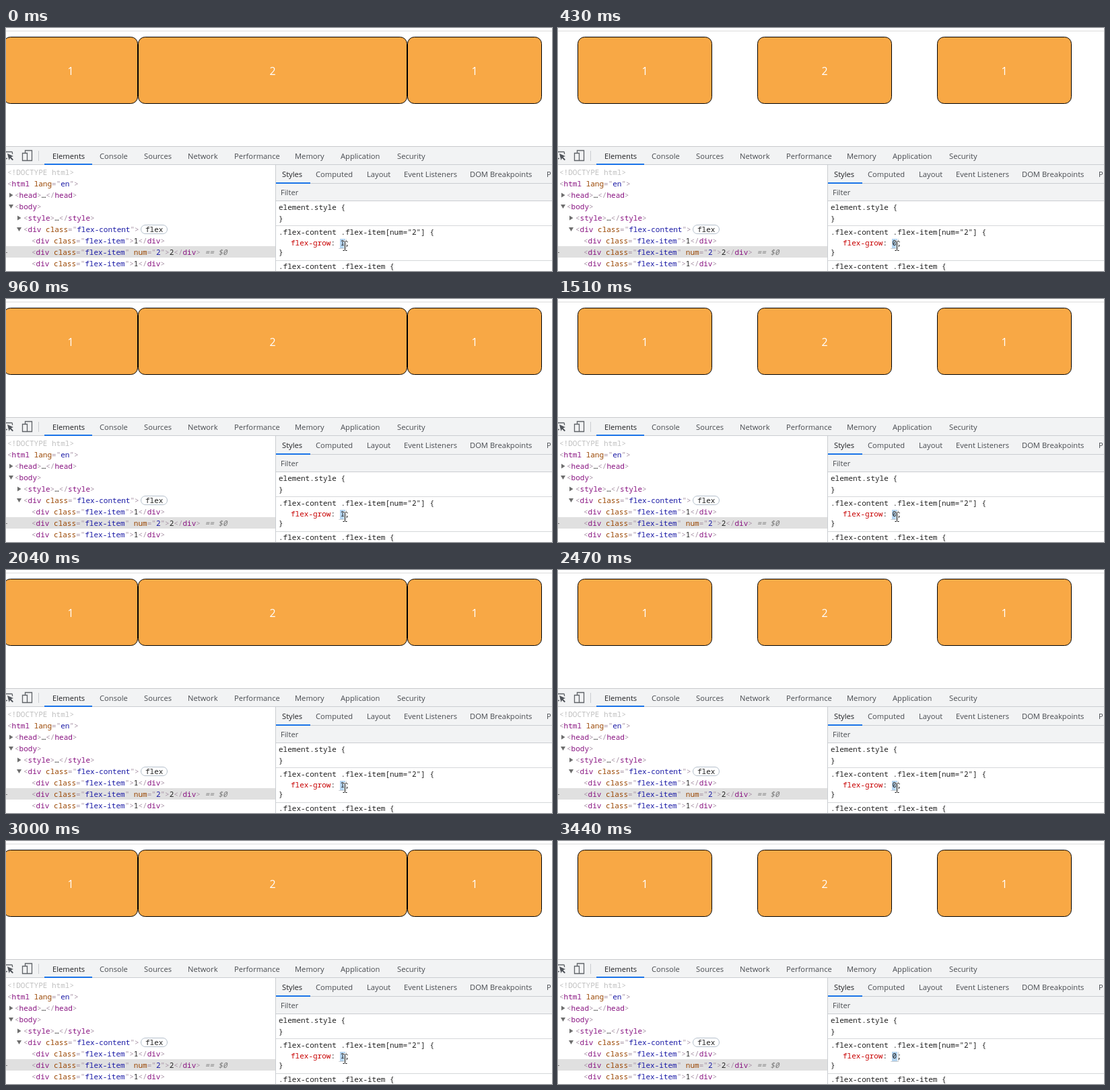
An HTML page that plays this animation: 811 by 362 pixels, repeating every 3.9 s.

```html
<!DOCTYPE html>
<html lang="en">
<head>
<meta charset="utf-8">
<title>flex-grow toggle</title>
<style>
html, body { margin: 0; width: 100%; height: 100%; overflow: hidden; background: #fff; }
svg { display: block; }
text { white-space: pre; }
.ui { font: 11.2px "Open Sans", "Noto Sans", sans-serif; fill: #484b50; }
.ui.on { fill: #202124; }
.code { font: 11px "Noto Sans Mono", "DejaVu Sans Mono", monospace; fill: #222; }
.num { font: 16px "Open Sans", "Noto Sans", sans-serif; fill: #fff; text-anchor: middle; }
.p { fill: #a894a6; }
.t { fill: #881280; }
.a { fill: #994500; }
.v { fill: #1a1aa6; }
.red { fill: #c80000; }
.doc { fill: #c0c0c0; }
.ref { fill: #777; font-style: italic; }
</style>
</head>
<body>
<svg id="stage" width="811" height="362" viewBox="0 0 811 362"></svg>
<script>
const stage = document.getElementById("stage");
const LOOP = 3900;
const TOGGLES = [430, 960, 1510, 2040, 2470, 3000, 3440];
const WIDE = [[-4, 200], [196, 400], [596, 200]];
const EVEN = [[29, 200], [296, 200], [563, 200]];

const esc = s => s.replace(/&/g, "&amp;").replace(/</g, "&lt;").replace(/>/g, "&gt;");
const rect = (x, y, w, h, fill, more = "") =>
  `<rect x="${x}" y="${y}" width="${w}" height="${h}" fill="${fill}" ${more}/>`;
const path = (d, more) => `<path d="${d}" ${more}/>`;
const label = (x, y, s, cls = "ui") => `<text x="${x}" y="${y}" class="${cls}">${esc(s)}</text>`;
const code = (x, y, parts) => `<text x="${x}" y="${y}" class="code">${parts}</text>`;
const span = (cls, s) => `<tspan class="${cls}">${esc(s)}</tspan>`;

const open = (tag, attrs = {}) => span("p", "<") + span("t", tag) +
  Object.entries(attrs).map(([k, v]) =>
    " " + span("a", k) + span("p", '="') + span("v", v) + span("p", '"')).join("") +
  span("p", ">");
const close = tag => span("p", "</") + span("t", tag) + span("p", ">");
const arrow = (x, y, down) => path(
  down ? `M${x} ${y - 3}h7l-3.5 6z` : `M${x + 1} ${y - 3.5}v7l5.5-3.5z`, 'fill="#6e6e6e"');

function toolbars() {
  const top = [[69, "Elements"], [139, "Console"], [205, "Sources"], [270, "Network"],
    [339, "Performance"], [429, "Memory"], [497, "Application"], [581, "Security"]];
  const side = [[410, "Styles"], [460, "Computed"], [536, "Layout"],
    [591, "Event Listeners"], [689, "DOM Breakpoints"], [803, "P"]];
  const tabs = (list, y) => list.map(([x, s], i) => label(x, y, s, i ? "ui" : "ui on")).join("");
  const line = 'fill="none" stroke="#5f6368" stroke-width="1.3"';
  return rect(0, 4, 811, 1, "#dcdcdc") +
    rect(0, 176, 811, 28, "#f2f3f4") + rect(0, 176, 811, 1, "#c8cacd") +
    rect(0, 203, 811, 1, "#cacdd1") + rect(57, 202, 71, 2, "#1a73e8") +
    path("M0 184.5H8.5Q9.5 184.5 9.5 186V188M0 194.5H2", line) +
    path("M2 187L11 191L7.5 192.3L11 196L9.5 197.3L6 193.8L4.5 197z", 'fill="#50545a"') +
    path("M28.5 186V182.5H38.5V197.5H32M24.5 186.5H31.5V197.5H24.5z", line) +
    rect(48, 183, 1, 15, "#cacdd1") + tabs(top, 195) +
    rect(400, 204, 411, 54, "#f2f3f4") + rect(401, 231, 410, 1, "#cacdd1") +
    rect(401, 230, 51, 2, "#1a73e8") + rect(401, 257, 410, 1, "#cacdd1") +
    tabs(side, 222) + label(408, 248.5, "Filter");
}

function elementsTree() {
  const item = (y, n, attrs = {}) =>
    code(38, y, open("div", { class: "flex-item", ...attrs }) + n + close("div") +
      (attrs.num ? span("ref", " == $0") : ""));
  return rect(0, 325, 400, 17, "#e0e0e0") +
    code(2, 219, span("doc", "<!DOCTYPE html>")) +
    code(2, 236, open("html", { lang: "en" })) +
    arrow(4, 249) + code(13, 253, open("head") + "…" + close("head")) +
    arrow(4, 266, true) + code(13, 270, open("body")) +
    arrow(16, 283) + code(26, 287, open("style") + "…" + close("style")) +
    arrow(16, 300, true) + code(26, 304, open("div", { class: "flex-content" })) +
    rect(200.5, 293.5, 39, 13, "#fff", 'rx="6.5" stroke="#b4bfcb"') + code(207, 304, "flex") +
    item(321, 1) + item(338, 2, { num: "2" }) + item(355, 1) +
    rect(0, 334, 2, 1, "#777");
}

function stylesPane() {
  const rule = (y, s) => code(405, y, s);
  return rect(400, 204, 1, 158, "#cacdd1") +
    rule(271, "element.style {") + rule(288, "}") + rect(401, 294, 410, 1, "#d5d7da") +
    rule(308, '.flex-content .flex-item[num="2"] {') +
    code(423, 324, span("red", "flex-grow") + ":") +
    rect(494, 314, 12, 15, "#c9cccf", 'rx="1"') + rect(493, 313, 12, 15, "#fff") +
    rect(496, 314, 8, 14, "#b4d4f0") +
    '<text id="value" x="496.5" y="324" class="code"></text>' + code(503.5, 324, ";") +
    rule(338, "}") + rect(401, 346, 410, 1, "#d5d7da") +
    rule(359, ".flex-content .flex-item {");
}

function pointer() {
  const d = "M500.5 317.5H502.5L503.5 318.5L504.5 317.5H506.5M503.5 318.5V330.5" +
    "M500.5 331.5H502.5L503.5 330.5L504.5 331.5H506.5";
  return `<g id="pointer" fill="none">${path(d, 'stroke="#fff" stroke-width="2.6"')}` +
    `${path(d, 'stroke="#111"')}</g>`;
}

const boxes = [1, 2, 1].map(n =>
  `<g class="box">${rect(0, 13.5, 0, 99, "#f8a845", 'rx="10" stroke="#000"')}` +
  `${label(0, 70, String(n), "num")}</g>`).join("");

stage.innerHTML = rect(0, 0, 811, 362, "#fff") + boxes + toolbars() +
  elementsTree() + stylesPane() + pointer();

const items = [...stage.querySelectorAll(".box")];
const value = document.getElementById("value");
const cursor = document.getElementById("pointer");
let shown = -1;

function show(step) {
  if (step === shown) return;
  shown = step;
  const even = step % 2 === 1;
  (even ? EVEN : WIDE).forEach(([x, w], i) => {
    const [box, digit] = items[i].children;
    box.setAttribute("x", x + 0.5);
    box.setAttribute("width", w - 1);
    digit.setAttribute("x", x + w / 2);
  });
  value.textContent = even ? "0" : "1";
  cursor.style.display = step === TOGGLES.length ? "none" : "";
}

const start = performance.now();
function tick() {
  const time = (performance.now() - start) % LOOP;
  show(TOGGLES.filter(at => at <= time).length);
  requestAnimationFrame(tick);
}
tick();
</script>
</body>
</html>
```
